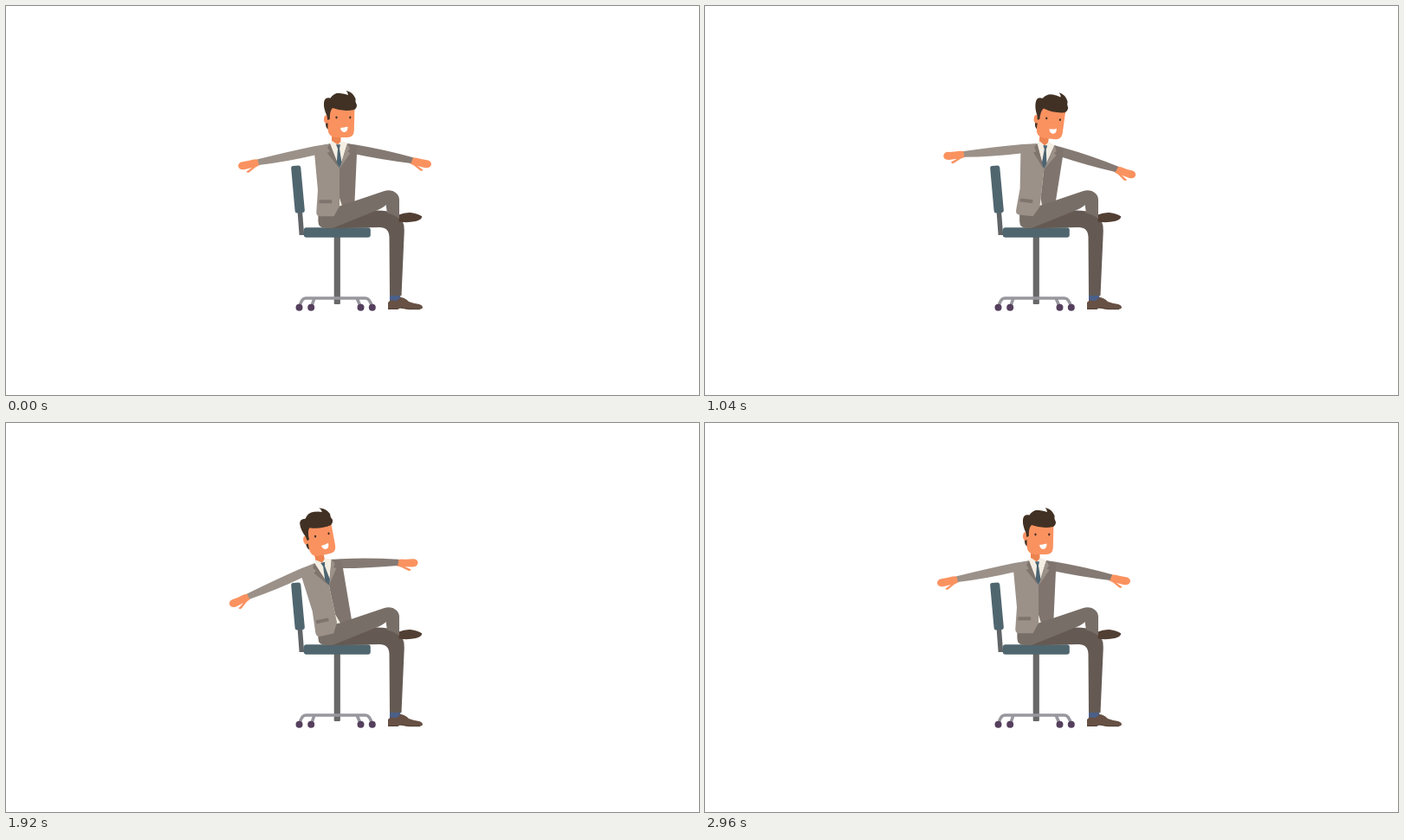
An HTML page with a canvas that plays this animation: 800x450 px, repeating every 3000 ms.

```html
<!DOCTYPE html>
<html lang="en">
<head>
<meta charset="utf-8">
<title>Chair stretch</title>
<style>
  html, body { margin: 0; width: 100%; height: 100%; overflow: hidden; background: #fff; }
  canvas { display: block; width: 800px; height: 450px; }
</style>
</head>
<body>
<canvas id="stage" width="800" height="450"></canvas>
<script>
const ctx = document.getElementById('stage').getContext('2d');
const LOOP = 3000, STEP = 40;
const PIVOT = { x: 379.5, y: 245 };

const color = {
  chair: '#50666f', post: '#686868', back: '#606466', base: '#98979d', wheel: '#553f5d',
  light: '#9b9189', mid: '#7f756e', sleeve: '#847a73', nearLeg: '#776e67', farLeg: '#645a53',
  skin: '#fa9260', neck: '#ec8350', hair: '#403124', shirt: '#f4eee3', tie: '#4d6471',
  shoe: '#675044', shoeDark: '#523f34', sock: '#4b5f88'
};

// Each lean: start, end, from angle, to angle, ease-out power.
const leans = [
  [0, 560, 0, 22, 2],
  [720, 1360, 22, 0, 1.8],
  [1560, 2200, 0, -15, 2],
  [2320, 2960, -15, 0, 1.8]
];

function leanAt(t) {
  let angle = 0;
  for (const [start, end, from, to, power] of leans) {
    if (t < start) break;
    const p = Math.min(1, (t - start) / (end - start));
    angle = to + (from - to) * Math.pow(1 - p, power);
  }
  return angle;
}

function fill(style, d) {
  ctx.fillStyle = style;
  ctx.fill(new Path2D(d));
}

function line(style, width, d) {
  ctx.strokeStyle = style;
  ctx.lineWidth = width;
  ctx.stroke(new Path2D(d));
}

function oval(style, x, y, rx, ry = rx) {
  ctx.fillStyle = style;
  ctx.beginPath();
  ctx.ellipse(x, y, rx, ry, 0, 0, Math.PI * 2);
  ctx.fill();
}

function box(style, x, y, w, h, r) {
  ctx.fillStyle = style;
  ctx.beginPath();
  ctx.roundRect(x, y, w, h, r);
  ctx.fill();
}

function leaning(angle, draw) {
  ctx.save();
  ctx.translate(PIVOT.x, PIVOT.y);
  ctx.rotate(angle * Math.PI / 180);
  ctx.translate(-PIVOT.x, -PIVOT.y);
  draw();
  ctx.restore();
}

function drawChair() {
  fill(color.back, 'M336.5 237H342L344.2 265H338.6Z');
  fill(color.chair, 'M331.5 185L338 184.5Q340 184.5 340.3 187L344.8 236Q345 238.6 342.5 239L336 239.5Q333.8 239.5 333.6 237L329.2 188Q329 185.2 331.5 185Z');
  box(color.post, 378.7, 266, 7.2, 79, 1);
  line(color.base, 3.6, 'M339 348Q341 338 346 338H415Q420 338 422.5 348M352.5 348L356 338M409.5 348L405 338');
  for (const x of [338.5, 352.2, 409.5, 422.8]) oval(color.wheel, x, 348.7, 4);
  box(color.chair, 343.8, 256.3, 77, 11.5, 3);
}

function drawFarLeg() {
  fill(color.sock, 'M443 333H455L456 342H443Z');
  fill(color.shoe, 'M441 343Q444 339 448 341Q452 342 455 337Q460 337 465 342Q470 344 477 345Q481 346 481 349Q480 351 475 351H465L454 349L452 351H441Z');
  line(color.shoeDark, 1, 'M441 350.5H452L455 349L465 350.7H478');
  fill(color.farLeg, 'M370 257.5L400 242L424 236.5Q441 236 450 240Q460 246 459.8 260L456.5 335H443L442.5 267Q442 256 431 256Z');
}

function drawNearLeg(angle) {
  const hip = 360.4 + (angle > 0 ? 5 * (1 - Math.exp(-angle / 8)) : 0);
  fill(color.shoeDark, 'M453.5 241.5Q460 238.5 467 239Q476 240 480.3 243.5Q480 247 473 249Q464 251 453.5 249.5Z');
  fill(color.nearLeg, `M${hip} 236L385 231.5L436 214.3C446 211 454 217 454 224V246Q448 241 440 239.5L438.6 230Q436 233 429 236L377 257H${hip + 9}Q${hip} 257 ${hip} 249Z`);
}

function drawHand() {
  fill(color.skin, 'M292 177.3L286 177.6Q280 179.5 273 180.2Q268 181 268 185.3Q269 189.8 275 189.2L284 187L277.5 191.5Q278.5 193.7 281 192.3L288 186.5L293 184Z');
}

function drawArms() {
  drawHand();
  ctx.save();
  ctx.translate(759, -2);
  ctx.scale(-1, 1);
  drawHand();
  ctx.restore();
  fill(color.light, 'M290.5 177.3Q328 168 357 162L373 159.5L370 172L356.5 172.5Q325 180 292 184Z');
  fill(color.sleeve, 'M393 159L404 160.5Q437 166 470 175.3L467.5 182Q432 177.5 404 171.5L395 172Z');
}

function drawBackOfTorso() {
  drawArms();
  fill(color.shirt, 'M373 159L384 156L395 159L390 232.5L384 234Z');
  fill(color.mid, 'M385 187L394 159L404.8 162L405 171L402 237H390L385 222Z');
}

function drawFrontOfTorso() {
  fill(color.light, 'M374 159.3L385 187V231.5L378.5 243.3H362Q358 243 358.3 238L360 213L356.2 172L361 162Z');
  box(color.mid, 361.5, 224.2, 14.7, 4, 0.5);
  fill(color.neck, 'M376 148H386.5V158L382 161L376 157Z');
  fill(color.shirt, 'M374 158.8L376.5 156L383 160.5L387 156L394 158.8L385 187.5Z');
  fill(color.mid, 'M374 159L385 188L370.8 170L374 168.5L371 164Z');
  fill(color.light, 'M394 159L397 165L394.5 168.5L397.5 170L385 188Z');
  fill(color.tie, 'M381 160.3H386L385 165L387.5 181L385 187.5L381.8 181L383 165Z');
}

function drawHead() {
  fill(color.hair, 'M369 133L373 134V143Q369 142 369 136Z');
  fill(color.skin, 'M372 115H402.5L401.8 144Q401.5 152 394 152H381Q371.5 151.5 371.5 142Z');
  oval(color.skin, 370, 131, 3, 4.8);
  fill(color.hair, 'M370.5 127Q366.5 119 367 112Q367.5 105 374.5 106.5Q379 100 386 101Q391 101.5 395 103Q395 100 392.5 98Q400 99 403.5 107Q402.8 111 405 114.5Q405 118 402 120Q389 122.5 377 118Q373.5 121 373.8 131L371.3 132Z');
  oval(color.hair, 381.5, 129, 1.1, 1.4);
  oval(color.hair, 397.3, 129, 1.1, 1.4);
  fill('#fff', 'M386 141Q390 141 394.5 139.6Q394.7 145.8 390.3 146Q386.8 145.5 386 141Z');
}

function render(t) {
  const angle = leanAt(t);
  ctx.fillStyle = '#fff';
  ctx.fillRect(0, 0, 800, 450);
  drawChair();
  leaning(angle, drawBackOfTorso);
  drawFarLeg();
  drawNearLeg(angle);
  leaning(angle, () => {
    drawFrontOfTorso();
    drawHead();
  });
}

const began = performance.now();
function tick() {
  const t = (performance.now() - began) % LOOP;
  render(Math.floor(t / STEP) * STEP);
  requestAnimationFrame(tick);
}
tick();
</script>
</body>
</html>
```
